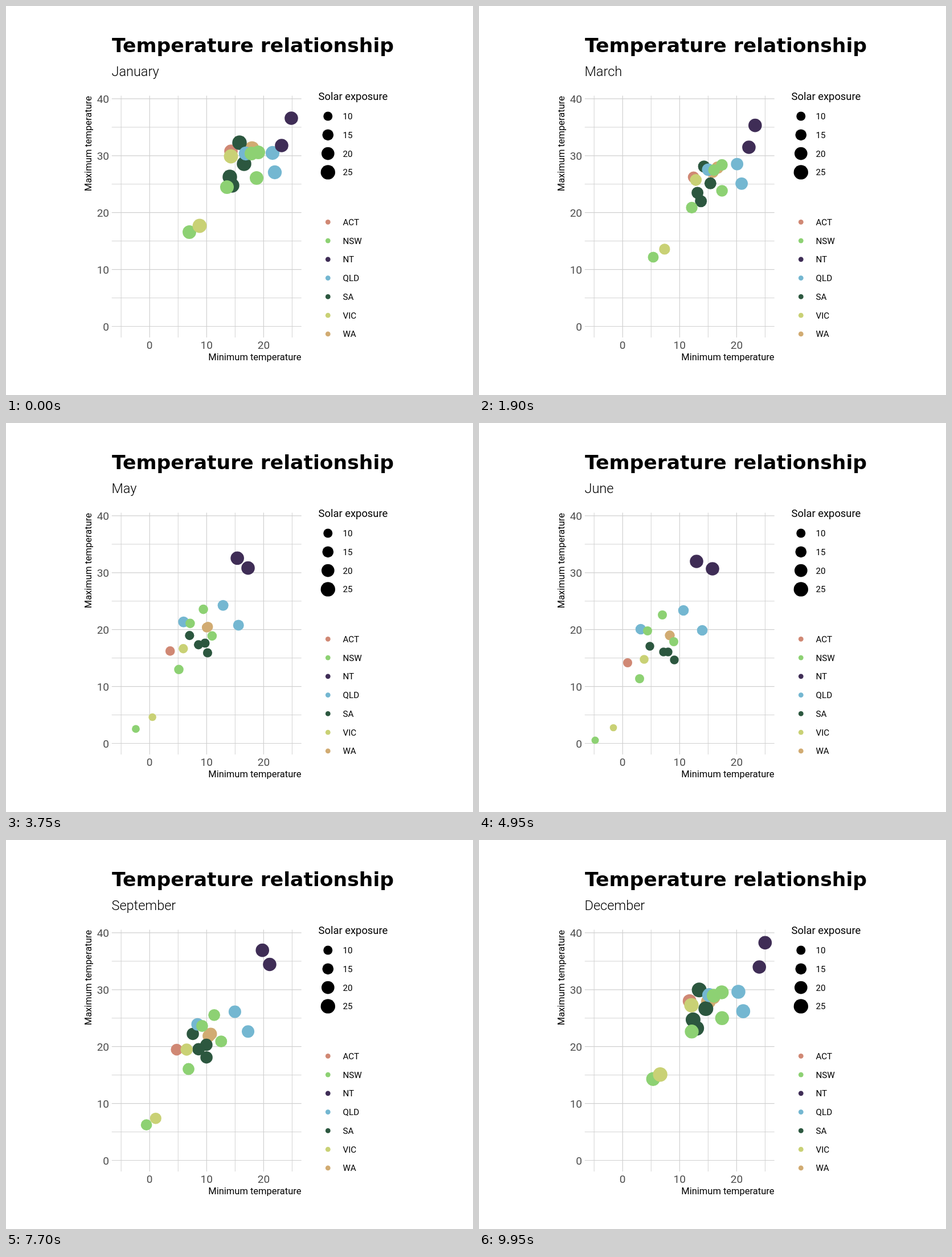
An HTML page with a canvas for the animation above (10 s loop, 820x683 px).

```html
<!DOCTYPE html>
<html lang="en">
<head>
<meta charset="utf-8">
<title>Temperature relationship</title>
<style>
  html, body { margin: 0; width: 100%; height: 100%; overflow: hidden; background: #fff; }
  canvas { display: block; }
</style>
</head>
<body>
<canvas id="stage" width="820" height="683"></canvas>
<script>
const ctx = document.getElementById('stage').getContext('2d');
const SANS = 'Roboto, sans-serif';
const MONTHS = ['January', 'February', 'March', 'April', 'May', 'June', 'July',
  'August', 'September', 'October', 'November', 'December'];

// Dot colour, summer and winter radius, and how far spring bends the path.
const REGIONS = {
  ACT: { color: '#d08874', radius: [12, 8], spring: [-8, 4] },
  NSW: { color: '#8dd173', radius: [12.2, 8], spring: [3, -3] },
  NT: { color: '#3f2d56', radius: [11.8, 11.8], spring: [33, -40] },
  QLD: { color: '#74b7d1', radius: [12.3, 9.3], spring: [7, -4] },
  SA: { color: '#2c573f', radius: [13, 7.7], spring: [-11, 0] },
  VIC: { color: '#c9d175', radius: [12.7, 7.8], spring: [-10, 5] },
  WA: { color: '#d1ab72', radius: [12.8, 8.5], spring: [-10, 11] }
};

// Each station swings between a summer and a winter point. Back to front.
const STATIONS = [
  ['ACT', [395, 255], [261, 421]],
  ['WA', [422, 260], [335, 373]],
  ['WA', [432, 250], [335, 373]],
  ['SA', [410, 240], [300, 392]],
  ['SA', [418, 277], [332, 402]],
  ['SA', [397, 315], [343, 416]],
  ['SA', [393, 300], [324, 402]],
  ['QLD', [421, 259], [284, 362]],
  ['QLD', [468, 258], [359, 329]],
  ['QLD', [472, 292], [392, 364]],
  ['NSW', [322, 397], [204, 557]],
  ['NSW', [388, 318], [282, 449]],
  ['NSW', [440, 302], [342, 384]],
  ['NSW', [431, 259], [296, 365]],
  ['NSW', [443, 257], [322, 337]],
  ['VIC', [395, 264], [290, 415]],
  ['VIC', [340, 386], [236, 535]],
  ['NT', [484, 245], [410, 256]],
  ['NT', [501, 197], [382, 243]]
];

const lerp = (a, b, p) => a + (b - a) * p;
const clamp = v => Math.min(1, Math.max(0, v));
const smooth = v => v * v * (3 - 2 * v);

// 0 in January, 1 in winter: an eased cooling, then a steady warming.
function coldness(month, lag) {
  const cooling = smooth(clamp((month - 1) / 5.1) ** lag);
  const warming = clamp((month - 7.85) / 4.9);
  return cooling - warming;
}

function dot(x, y, r, color) {
  ctx.fillStyle = color;
  ctx.beginPath();
  ctx.arc(x, y, r, 0, Math.PI * 2);
  ctx.fill();
}

function text(str, x, y, font, color = '#000', align = 'left') {
  ctx.font = font;
  ctx.fillStyle = color;
  ctx.textAlign = align;
  ctx.fillText(str, x, y);
}

function line(x1, y1, x2, y2, width) {
  ctx.strokeStyle = '#d0d0d0';
  ctx.lineWidth = width;
  ctx.beginPath();
  ctx.moveTo(x1, y1);
  ctx.lineTo(x2, y2);
  ctx.stroke();
}

function drawAxes() {
  const tick = `19px ${SANS}`, label = `16.5px ${SANS}`, grey = '#4d4d4d';
  for (let v = -5; v <= 25; v += 5) {
    const x = 252.2 + v * 10.01, major = v % 10 === 0;
    line(x, 157.5, x, 582, major ? 1.2 : .9);
    if (major) text(v, x, 601.5, tick, grey, 'center');
  }
  for (let v = 0; v <= 40; v += 5) {
    const y = 562.5 - v * 9.99, major = v % 10 === 0;
    line(185.7, y, 518.7, y, major ? 1.2 : .9);
    if (major) text(v, 181, y + 7, tick, grey, 'right');
  }
  text('Minimum temperature', 518.5, 622, label, '#000', 'right');
  ctx.save();
  ctx.translate(149.8, 158);
  ctx.rotate(-Math.PI / 2);
  text('Maximum temperature', 0, 0, label, '#000', 'right');
  ctx.restore();
}

function drawLegend() {
  const font = `15.2px ${SANS}`;
  text('Solar exposure', 548.5, 165, `18.4px ${SANS}`);
  for (let i = 0; i < 4; i++) {
    const y = 193.5 + i * 32.8;
    dot(565.3, y, 8 + 4.7 * (i / 3) ** .85, '#000');
    text(10 + i * 5, 591.5, y + 5.5, font);
  }
  Object.keys(REGIONS).forEach((name, i) => {
    const y = 379.3 + i * 32.77;
    dot(565.3, y, 4.4, REGIONS[name].color);
    text(name, 591.5, y + 5.5, font);
  });
}

function drawStations(month) {
  const night = coldness(month, 1.65), day = coldness(month, 1.2);
  const spring = Math.sin(Math.PI * clamp((month - 7.85) / 5.2));
  const dim = .5 - .5 * Math.cos(2 * Math.PI * (month - .2) / 12);
  for (const [region, summer, winter] of STATIONS) {
    const { color, radius, spring: bend } = REGIONS[region];
    const alpine = winter[1] > 500 ? 1.5 : 0;
    dot(lerp(summer[0], winter[0], night) + bend[0] * spring,
      lerp(summer[1], winter[1], day) + bend[1] * spring,
      lerp(radius[0], radius[1] - alpine, dim), color);
  }
}

function draw(now) {
  const step = Math.floor(now / 50) % 200;
  const month = 1 + 11 * step / 199;
  ctx.fillStyle = '#fff';
  ctx.fillRect(0, 0, 820, 683);
  text('Temperature relationship', 186, 80.5, 'bold 34.6px "DejaVu Sans", sans-serif');
  text(MONTHS[Math.floor(month) - 1], 185.5, 123, `300 23.5px ${SANS}`);
  drawAxes();
  drawLegend();
  drawStations(month);
}

const start = performance.now();
function tick() {
  draw(performance.now() - start);
  requestAnimationFrame(tick);
}
tick();
</script>
</body>
</html>
```
